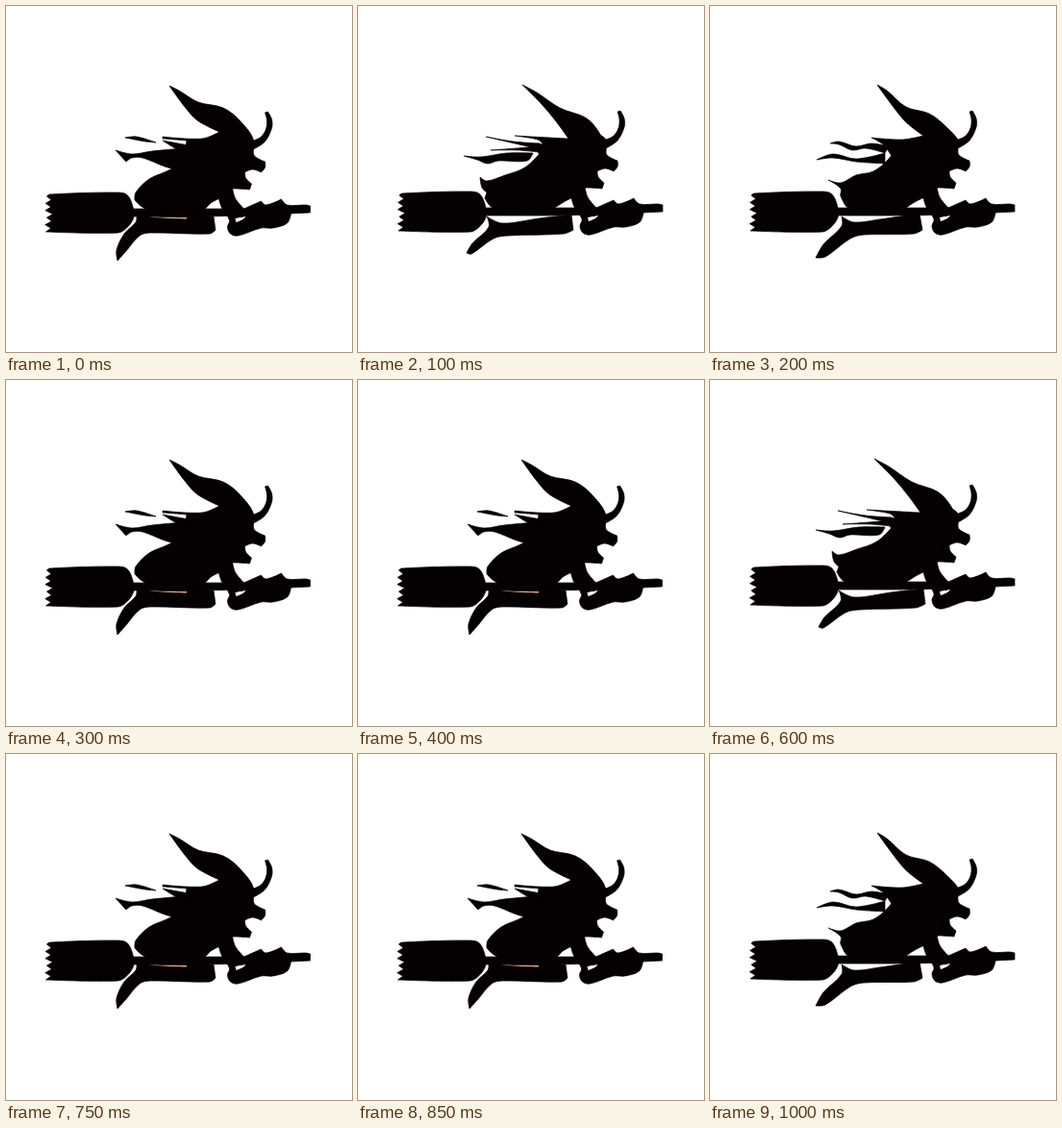
Recreate the animation shown at these times as an HTML page with a canvas. Size 360x360 px, loop 1050 ms.

```html
<!DOCTYPE html>
<html lang="en">
<head>
<meta charset="utf-8">
<title>Witch on a broom</title>
<style>
html, body { margin: 0; width: 100%; height: 100%; overflow: hidden; background: #fff; }
canvas { display: block; width: 360px; height: 360px; }
</style>
</head>
<body>
<canvas id="stage" width="360" height="360"></canvas>
<script>
const ctx = document.getElementById('stage').getContext('2d');
const STEP = 50;
const ORDER = 'ABCABCABACABCABACACAB';
const INK = '#050001';

const parse = text => text.trim().split(/\s+/).map(p => p.split(',').map(Number));

// Unit tangent at b, or zero where the outline turns sharply
function tangent(a, b, c) {
  const ux = b[0] - a[0], uy = b[1] - a[1], vx = c[0] - b[0], vy = c[1] - b[1];
  const cos = (ux * vx + uy * vy) / (Math.hypot(ux, uy) * Math.hypot(vx, vy));
  if (cos < 0.5) return [0, 0];
  const len = Math.hypot(ux + vx, uy + vy);
  return [(ux + vx) / len, (uy + vy) / len];
}

// Closed curve through the points, keeping sharp corners
function blob(points, color = INK) {
  const n = points.length;
  const at = i => points[(i + n) % n];
  const slopes = points.map((p, i) => tangent(at(i - 1), p, at(i + 1)));
  ctx.beginPath();
  ctx.moveTo(...points[0]);
  for (let i = 0; i < n; i++) {
    const p = at(i), q = at(i + 1), s = slopes[i], t = slopes[(i + 1) % n];
    const k = Math.hypot(q[0] - p[0], q[1] - p[1]) / 3;
    ctx.bezierCurveTo(p[0] + s[0] * k, p[1] + s[1] * k,
                      q[0] - t[0] * k, q[1] - t[1] * k, q[0], q[1]);
  }
  ctx.closePath();
  ctx.fillStyle = color;
  ctx.fill();
  if (color === INK) ctx.stroke();
}

const shape = (text, color) => blob(parse(text), color);

function broom() {
  const teeth = Array.from({ length: 11 }, (_, i) => [
    i % 2 ? 48 - Math.sin(i) : 42 + Math.sin(i * 2),
    234 - i * 3.7
  ]);
  blob([...teeth, ...parse('46,195 117,193 127,196 133,210 133,220 126,230 117,235')]);
  shape('130,210 260,210 260,217 200,218 130,218');
}

function arm() {
  shape(`221,196 236,188 239,199 248,210 266,202 271,206 287,200 293,206 312,206
    317,207 317,214 297,215 293,225 278,230 266,230 242,238 234,236 231,229
    233,222 225,209`);
  shape('239,220 250,218 247,221 240,224', '#fff');
}

function head() {
  shape(`222,140 253,135 258,139 266,135 271,127 272,118 270,110 273,109 277,117
    277,126 270,140 258,148 259,155 270,161 270,167 266,172 257,169 249,172
    250,178 256,184 254,190 237,189 225,190 205,180`);
}

function shared(dx, dy) {
  ctx.save();
  ctx.translate(dx, dy);
  broom();
  arm();
  head();
  ctx.restore();
}

const poses = {
  A() {
    shared(-0.5, 1);
    shape(`170,83 180,88 200,100 226,106 244,120 258,142 250,165 205,165 188,150
      188,140 163,138 163,136 204,138 222,131 199,119 186,105`);
    shape(`245,165 234,192 213,205 206,211 146,211 134,202 135,194 149,180
      174,168 190,147 235,145`);
    shape('125,162 114,150 131,154 152,151 185,148 190,165 173,169 142,158 131,158');
    shape('163,140 190,145 190,152 178,149');
    shape('124,137 136,136 156,142 145,141');
    shape(`136,219 216,219 218,233 212,237 150,236 139,239 125,255 116,265
      115,254 123,237 135,225`);
    shape('148,219.5 188,220 188,221.5 170,221', '#d9a58c');
  },
  B() {
    shared(0, 0);
    shape(`174,82 184,88 204,105 228,112 246,126 258,142 250,165 195,160 180,144
      168,137 200,139 222,135 204,121 190,104`);
    shape(`245,165 236,190 213,204 198,212 146,211 136,198 136,190 123,181
      136,184 152,176 170,172 185,160 200,140`);
    shape('111,160 128,154 152,159 182,153 182,164 152,162 128,158');
    shape('125,143 134,141 152,146 168,143 186,146 182,153 162,148 148,150 134,144');
    shape(`137,219 150,225 176,222 218,216 221,233 212,237 160,238 146,242
      120,261 110,262 118,248 137,229`);
  },
  C() {
    shared(0, 0);
    shape(`171,82 186,90 210,106 238,117 253,135 258,150 250,165 195,160 185,148
      192,143 187,139 163,135 200,137 219,138 206,120 190,101`);
    shape(`245,165 236,190 214,204 198,212 142,211 132,200 134,194 129,189
      127,178 134,182 153,176 172,169 185,158 200,140`);
    shape('110,156 128,157 155,153 182,153 176,161 146,161 135,164 124,160');
    shape('138,150 165,148 188,146 188,152 165,150');
    shape('133,136 162,141 190,143 190,149 176,146');
    shape(`134,219 150,226 188,221 222,217 224,233 214,237 156,239 141,242
      118,258 113,257 119,247 136,230`);
  }
};

const start = performance.now();
function tick() {
  const step = Math.floor((performance.now() - start) / STEP) % ORDER.length;
  ctx.fillStyle = '#fff';
  ctx.fillRect(0, 0, 360, 360);
  ctx.strokeStyle = INK;
  ctx.lineWidth = 0.7;
  ctx.lineJoin = 'round';
  poses[ORDER[step]]();
  requestAnimationFrame(tick);
}
tick();
</script>
</body>
</html>
```
